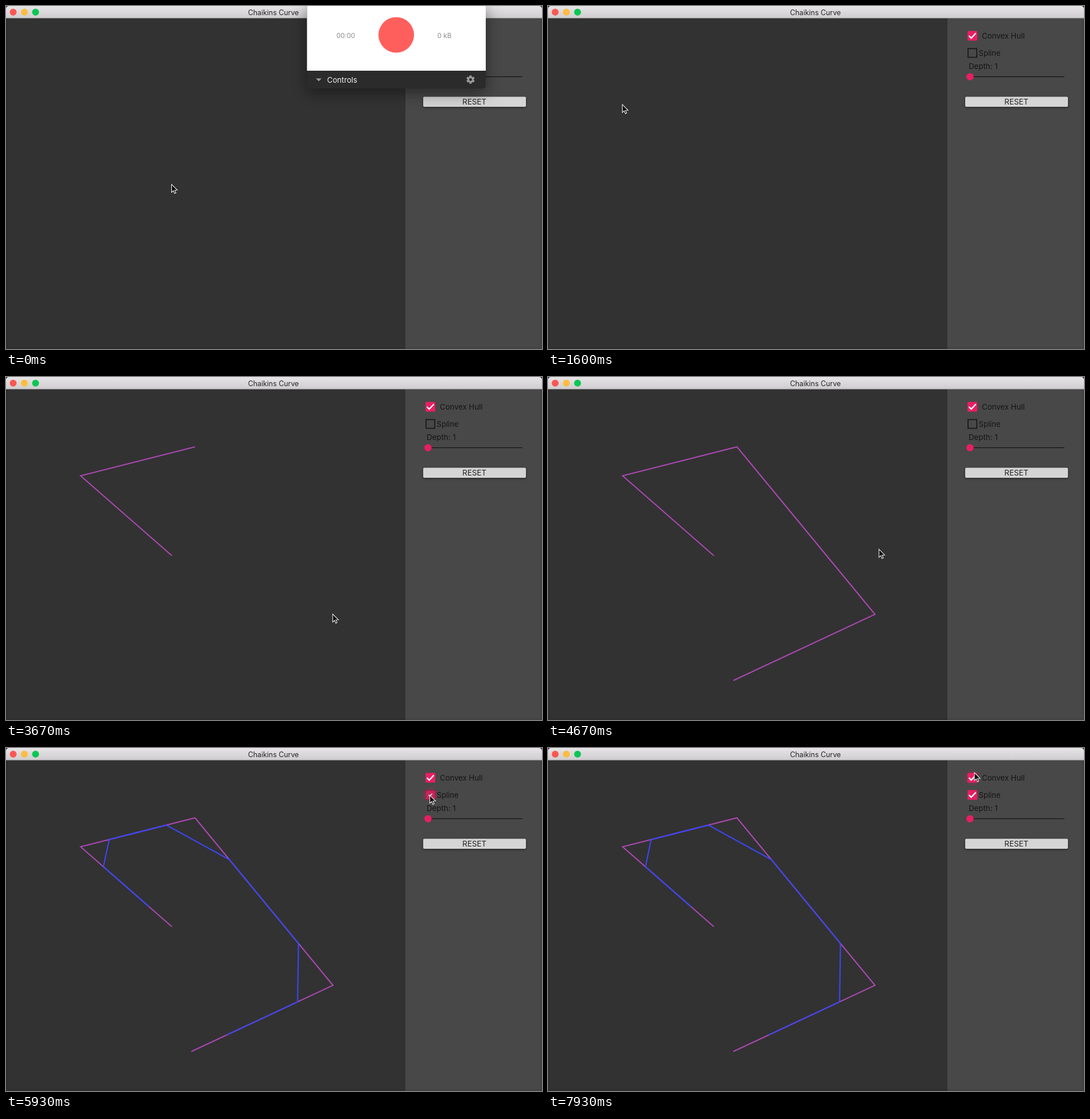
Recreate the animation shown at these times as an HTML page with a canvas. Size 934 by 599 pixels, loop 8 s.

```html
<!DOCTYPE html>
<html>
<head>
<meta charset="utf-8">
<title>Chaikins Curve</title>
<style>
html, body { margin: 0; width: 100%; height: 100%; overflow: hidden; background: #323232; }
canvas { display: block; }
</style>
</head>
<body>
<canvas id="stage" width="934" height="599"></canvas>
<script>
const c = document.getElementById('stage').getContext('2d');
const LOOP = 8000, SPLINE_ON = 5830, PINK = '#e91e63', INK = '#151515';

// Where the pointer rests; a click adds a control point, a bow bends the way to the next stop
const stops = [
  { x: 289, y: 312, at: 0, click: 70, leave: 130, bow: [-4, 54] },
  { x: 130, y: 172.5, at: 1600, click: 1800, leave: 1800 },
  { x: 329.3, y: 122, at: 2200, click: 2530, leave: 2930 },
  { x: 569.8, y: 414.5, at: 3600, click: 3730, leave: 3760 },
  { x: 323, y: 530, at: 4130, click: 4330, leave: 4340, bow: [68, -28] },
  { x: 739, y: 83, at: 5050, leave: 6070 },
  { x: 742.5, y: 132.5, at: 6600, leave: 7690 },
  { x: 743.5, y: 43.5, at: 7930, leave: LOOP }
];

const clamp = v => Math.max(0, Math.min(1, v));
const ramp = (t, from, span) => clamp((t - from) / span);
const pulse = (t, from, to) => ramp(t, from, 120) * (1 - ramp(t, to, 120));

function pointer(t) {
  const i = stops.findLastIndex(s => t >= s.at);
  const a = stops[i], b = stops[i + 1] || a, [bx, by] = a.bow || [0, 0];
  const u = ramp(t, a.leave, b.at - a.leave || 1);
  const e = u * u * (3 - 2 * u), bend = 4 * e * (1 - e);
  return [a.x + (b.x - a.x) * e + bx * bend, a.y + (b.y - a.y) * e + by * bend];
}

function rect(x, y, w, h, fill, r = 0) {
  c.fillStyle = fill;
  c.beginPath();
  c.roundRect(x, y, w, h, r);
  c.fill();
}

function disc(x, y, r, fill) {
  c.fillStyle = fill;
  c.beginPath();
  c.arc(x, y, r, 0, 7);
  c.fill();
}

function trace(pts) {
  c.beginPath();
  pts.forEach(p => c.lineTo(...p));
}

function path(pts, width, color) {
  trace(pts);
  c.strokeStyle = color;
  c.lineWidth = width;
  c.stroke();
}

function text(s, x, y, size, color, align = 'left') {
  c.font = size + 'px Inter, Roboto, sans-serif';
  c.fillStyle = color;
  c.textAlign = align;
  c.fillText(s, x, y);
}

function shadow(color = 'transparent', blur = 0, y = 0) {
  c.shadowColor = color;
  c.shadowBlur = blur;
  c.shadowOffsetY = y;
}

// One round of corner cutting, open ends
function chaikin(pts) {
  return pts.slice(1).flatMap((b, i) =>
    [.25, .75].map(f => pts[i].map((v, n) => v + (b[n] - v) * f)));
}

function checkbox(y, fill, tick, halo) {
  disc(739.5, y, 13.5, `rgba(233,30,99,${.14 * halo})`);
  if (fill < 1) {
    c.strokeStyle = '#1a1a1a';
    c.lineWidth = 1.8;
    c.strokeRect(731.9, y - 7.6, 15.2, 15.2);
  }
  c.globalAlpha = fill;
  rect(731, y - 8.5, 17, 17, PINK, 2);
  c.globalAlpha = 1;
  c.save();
  c.translate(739.5, y);
  c.scale(tick, tick);
  if (tick) path([[-6, 0], [-2, 4], [6, -4.5]], 2.4, '#fff');
  c.restore();
}

function windowFrame() {
  rect(0, 0, 934, 599, '#323232');
  rect(696, 21, 238, 578, '#484848');
  for (let i = 0; i < 4; i++) {
    c.strokeStyle = `rgba(0,0,0,${.09 - i * .02})`;
    c.lineWidth = 1;
    c.strokeRect(i + .5, 21.5, 933 - 2 * i, 577 - i);
  }
  const bar = c.createLinearGradient(0, 0, 0, 21);
  bar.addColorStop(0, '#e6e4e6');
  bar.addColorStop(1, '#cfcdcf');
  rect(0, 0, 934, 6, '#2a2a2a');
  rect(0, 0, 934, 21, bar, [5, 5, 0, 0]);
  rect(0, 20.5, 934, 1, '#b2b0b2');
  ['#fc5753', '#fdbc40', '#0bc654'].forEach((col, i) => disc(12.5 + 19.5 * i, 10.7, 6, col));
  text('Chaikins Curve', 466, 15.5, 12.4, '#252525', 'center');
}

function panel(t) {
  checkbox(52, 1, 1, ramp(t, 7840, 80));
  checkbox(82, ramp(t, SPLINE_ON, 130), ramp(t, SPLINE_ON + 40, 120), pulse(t, 5000, 6280));
  text('Convex Hull', 756, 57, 13.2, INK);
  text('Spline', 750.5, 87, 13.1, INK);
  text('Depth: 1', 733, 109.5, 13.3, INK);
  rect(735, 123, 165, 1, '#0c0c0c');
  disc(735.3, 123.5, 12, `rgba(40,40,40,${.3 * pulse(t, 6400, 7740)})`);
  disc(735.3, 123.5, 6.3, PINK);
  shadow('rgba(0,0,0,.45)', 4, 1.5);
  rect(727, 158.5, 179, 17.5, '#d6d5d6', 2);
  shadow();
  text('RESET', 816.2, 172.2, 13.3, '#222', 'center');
}

function gear(x, y) {
  c.save();
  c.translate(x, y);
  for (let i = 0; i < 6; i++) {
    rect(-2, -7.2, 4, 5, '#999');
    c.rotate(Math.PI / 3);
  }
  disc(0, 0, 5.4, '#999');
  disc(0, 0, 2.4, '#2b2b2b');
  c.restore();
}

function recorder(t) {
  c.globalAlpha = 1 - ramp(t, 60, 200);
  shadow('rgba(0,0,0,.45)', 28, 8);
  rect(524.5, -5, 311.5, 149, '#2b2b2b', 5);
  shadow();
  rect(524.5, 0, 311.5, 113, '#fff');
  disc(680, 50.5, 31, '#ff5f5c');
  text('00:00', 592, 55.5, 11.6, '#8b8b8b', 'center');
  text('0 kB', 764, 55.5, 11.5, '#8b8b8b', 'center');
  text('Controls', 559.5, 134.2, 13.2, '#f2f2f2');
  trace([[540, 126.5], [550, 126.5], [545, 131.5]]);
  c.fillStyle = '#9a9a9a';
  c.fill();
  gear(809.5, 128.5);
  c.globalAlpha = 1;
}

function arrow(x, y) {
  c.save();
  c.translate(x - .5, y - .5);
  trace([[0, 0], [0, 14], [3.2, 11], [5.3, 16], [7.6, 15], [5.5, 10.3], [10, 10]]);
  c.closePath();
  shadow('rgba(0,0,0,.4)', 2, 1);
  c.fillStyle = '#0a0a0a';
  c.fill();
  shadow();
  c.strokeStyle = '#eee';
  c.lineWidth = 1.1;
  c.stroke();
  c.restore();
}

function draw(t) {
  windowFrame();
  const hull = stops.filter(s => t >= s.click).map(s => [s.x, s.y]);
  path(hull, 2, '#ab48b2');
  if (t >= SPLINE_ON) path(chaikin(hull), 2.1, '#3b46fa');
  panel(t);
  recorder(t);
  arrow(...pointer(t));
}

const start = performance.now();
function tick() {
  draw((performance.now() - start) % LOOP);
  requestAnimationFrame(tick);
}
tick();
</script>
</body>
</html>
```
